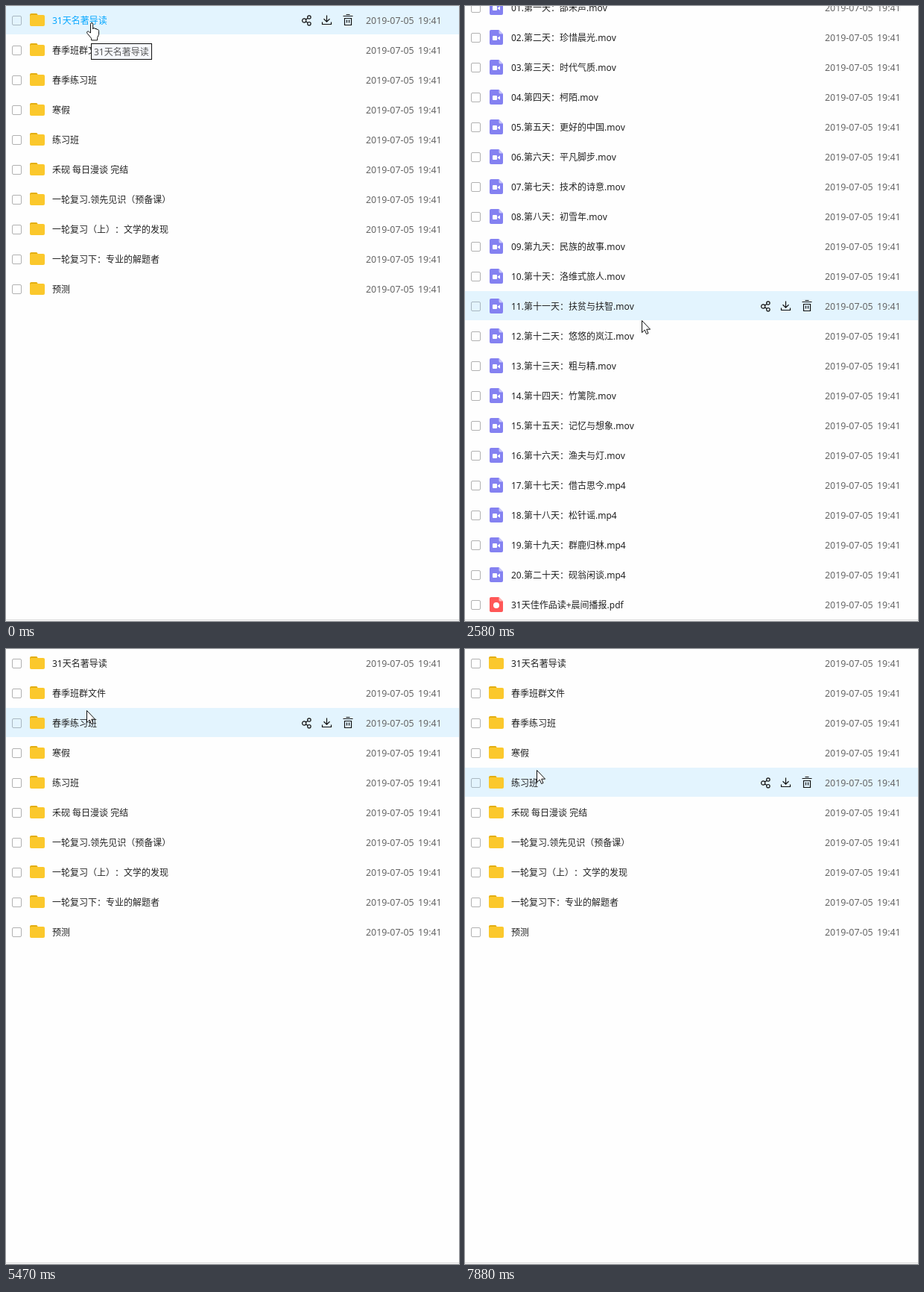
Recreate the animation shown at these times as an HTML page with a canvas. Size 608 px wide and 824 px high, loop 8000 ms.

```html
<!DOCTYPE html>
<html lang="zh-CN">
<head>
<meta charset="utf-8">
<title>文件列表</title>
<style>
  html, body { margin: 0; width: 100%; height: 100%; overflow: hidden; background: #fefefe; }
  canvas { display: block; }
</style>
</head>
<body>
<canvas id="stage" width="608" height="824"></canvas>
<script>
const ctx = document.getElementById('stage').getContext('2d');
const LOOP = 8000;
const FLOOR = 822;
const FONT = '"Noto Sans", "Noto Sans CJK SC", "Noto Sans CJK", sans-serif';

// The zero-width space keeps the bracket and colon at full width.
const home = [
  '31天名著导读', '春季班群文件', '春季练习班', '寒假', '练习班',
  '禾砚 每日漫谈 完结', '一轮复习.领先见识（预备课）',
  '一轮复习（上）\u200b：文学的发现', '一轮复习下：专业的解题者', '预测'
];

const topics = [
  '邵禾声', '珍惜晨光', '时代气质', '柯陌', '更好的中国', '平凡脚步', '技术的诗意',
  '初雪年', '民族的故事', '洛维式旅人', '扶贫与扶智', '悠悠的岚江', '粗与精', '竹篱院',
  '记忆与想象', '渔夫与灯', '借古思今', '松针谣', '群鹿归林', '砚翁闲谈'
];
const digits = '零一二三四五六七八九十';
function dayName(n) {
  if (n <= 10) return digits[n];
  return n < 20 ? '十' + digits[n - 10] : '二十';
}
const lessons = topics.map((topic, i) => {
  const n = i + 1;
  return `${String(n).padStart(2, '0')}.第${dayName(n)}天：${topic}.${n < 17 ? 'mov' : 'mp4'}`;
});
lessons.push('31天佳作品读+晨间播报.pdf');

const notes = [
  '春季班•创造奇迹•分析稿0302.pdf', '春季班第四次　品牌策略例文.pdf', '春季讲稿0309.pdf',
  '春季练习班　第二次.pdf', '练习班笔记０３１０.pdf', '语文春季•创造奇迹（完整）.pdf'
];
const drills = ['第一次', '第二次', '第三次'];

// Each step changes only the listed parts of the state.
const steps = [
  { t: 0, list: home, row: 0, link: true, tip: true, hand: true, at: [108, 22], scroll: 0 },
  { t: 970, list: lessons },
  { t: 1090, tip: false },
  { t: 1770, link: false, hand: false, at: [130, 132] },
  { t: 1920, row: 7, at: [190, 282], scroll: 17 },
  { t: 2040, row: 10, at: [229, 396] },
  { t: 2190, row: 11, at: [235, 424] },
  { t: 2310, at: [239, 431] },
  { t: 2580, row: 10, at: [237, 421] },
  { t: 3260, list: home, row: -1, scroll: 0 },
  { t: 3510, at: [228, 403] },
  { t: 3660, row: 8, at: [205, 330] },
  { t: 3790, row: 5, at: [160, 215] },
  { t: 3910, row: 2, at: [112, 107] },
  { t: 4050, row: 1, at: [100, 73] },
  { t: 4170, link: true, hand: true, at: [90, 54] },
  { t: 4320, at: [87, 51] },
  { t: 4570, list: notes, link: false },
  { t: 5160, list: home },
  { t: 5470, row: 2, hand: false, at: [108, 82] },
  { t: 5720, at: [108, 90] },
  { t: 5880, link: true, hand: true, at: [104, 99] },
  { t: 6180, list: drills, link: false },
  { t: 6300, row: -1, hand: false, at: [146, 140] },
  { t: 6420, at: [196, 198] },
  { t: 6540, at: [246, 254] },
  { t: 6660, at: [272, 286] },
  { t: 7220, list: home, row: 7 },
  { t: 7370, row: 6, at: [250, 270] },
  { t: 7490, at: [215, 245] },
  { t: 7610, row: 5, at: [172, 218] },
  { t: 7760, row: 4, at: [126, 188] },
  { t: 7880, at: [96, 162] }
];

const arrow = new Path2D('M.5 .5V16.6L4.2 13.1 6.6 18.5 9 17.5 6.7 12.2H11.6Z');
const hand = new Path2D(
  'M5.5 14V2.4Q5.6 .6 7.1 .6T8.7 2.4V8.8Q8.8 7.4 10.2 7.5T11.6 9Q11.8 8.1 13 8.3T14.2 10' +
  'Q14.6 9.2 15.6 9.6T16.6 11.4V16.2L14.6 20.5V23.9H6.6V21.3L1 14.6Q0 13 1.2 12.2T3.4 12.6Z');
const share = new Path2D(
  'M402.8 19.5a2.6 2.6 0 1 1-5.2 0a2.6 2.6 0 1 1 5.2 0M409.1 15a2.2 2.2 0 1 1-4.4 0a2.2 2.2 0 1 1 4.4 0' +
  'M409.1 23.7a2.2 2.2 0 1 1-4.4 0a2.2 2.2 0 1 1 4.4 0M402.5 18.2L405 16.3M402.5 20.8L405 22.5');
const download = new Path2D('M430.5 12.5V21M426.5 17.3L430.5 21.2 434.5 17.3M424.5 21.5V24.5H436.5V21.5');
const trash = new Path2D('M456.5 11.5H461.5M452.5 13.5H465.5M454.5 16.5H463.5V25.5H454.5ZM457.5 18.5V22.5M460.5 18.5V22.5');

function rounded(x, y, w, h, r, color) {
  ctx.fillStyle = color;
  ctx.beginPath();
  ctx.roundRect(x, y, w, h, r);
  ctx.fill();
}

function fillShape(path, color) {
  ctx.fillStyle = color;
  ctx.fill(new Path2D(path));
}

function text(str, x, y, color, size = 12) {
  ctx.font = `${size}px ${FONT}`;
  ctx.fontKerning = 'none';
  ctx.fillStyle = color;
  ctx.fillText(str, x, y);
}

function folderIcon() {
  rounded(32, 10, 10.5, 8, 2, '#e3ae10');
  rounded(32, 12, 20, 15, 2, '#fbc82c');
}

function fileIcon(name) {
  const pdf = name.endsWith('.pdf');
  fillShape('M35 9H45.5L51 14.5V27Q51 29 49 29H35Q33 29 33 27V11Q33 9 35 9Z',
    pdf ? '#ff5757' : '#8481f1');
  fillShape('M45.5 9L51 14.5H47Q45.5 14.5 45.5 13Z', pdf ? '#ffb5b5' : '#c8c6fb');
  if (pdf) {
    rounded(38, 16, 8, 8, 4, '#fff');
  } else {
    rounded(37, 17, 6, 6, 1, '#fff');
    fillShape('M43.5 20L47 17.3V22.7Z', '#fff');
  }
}

function drawRow(name, i, s) {
  const active = i === s.row;
  ctx.save();
  ctx.translate(0, i * 40 - s.scroll);
  if (active) {
    ctx.fillStyle = '#e3f4fe';
    ctx.fillRect(0, -1, 608, 39);
  }
  ctx.strokeStyle = active ? '#a9b8c1' : '#b2b2b2';
  ctx.lineWidth = 1;
  ctx.beginPath();
  ctx.roundRect(8.5, 13.5, 12, 12, 1.5);
  ctx.stroke();
  if (/\.(mov|mp4|pdf)$/.test(name)) fileIcon(name);
  else folderIcon();
  text(name, 62, 24, active && s.link ? '#06a7ff' : '#222');
  if (active) {
    ctx.strokeStyle = '#111';
    ctx.lineWidth = 1.2;
    [share, download, trash].forEach(p => ctx.stroke(p));
  }
  text('2019-07-05', 483, 24, '#666', 12.4);
  text('19:41', 553, 24, '#666', 12.4);
  ctx.restore();
}

function drawTip(str) {
  ctx.fillStyle = '#f6f8fd';
  ctx.fillRect(114, 50, 82, 22);
  ctx.strokeStyle = '#111';
  ctx.lineWidth = 1;
  ctx.strokeRect(114.5, 50.5, 81, 21);
  text(str, 118, 66, '#575757');
}

function drawPointer(s) {
  const shape = s.hand ? hand : arrow;
  ctx.save();
  ctx.translate(...s.at);
  ctx.fillStyle = '#fff';
  ctx.fill(shape);
  ctx.strokeStyle = '#111';
  ctx.lineWidth = 1;
  ctx.lineJoin = 'round';
  ctx.stroke(shape);
  ctx.restore();
}

function draw(time) {
  const s = Object.assign({}, ...steps.filter(step => step.t <= time));
  ctx.fillStyle = '#fefefe';
  ctx.fillRect(0, 0, 608, 824);
  ctx.save();
  ctx.beginPath();
  ctx.rect(0, 0, 608, FLOOR);
  ctx.clip();
  s.list.forEach((name, i) => drawRow(name, i, s));
  ctx.restore();
  ctx.fillStyle = '#d8d8d8';
  ctx.fillRect(0, FLOOR, 608, 1);
  if (s.tip) drawTip(home[0]);
  drawPointer(s);
}

const start = performance.now();
function tick() {
  draw((performance.now() - start) % LOOP);
  requestAnimationFrame(tick);
}
tick();
</script>
</body>
</html>
```
